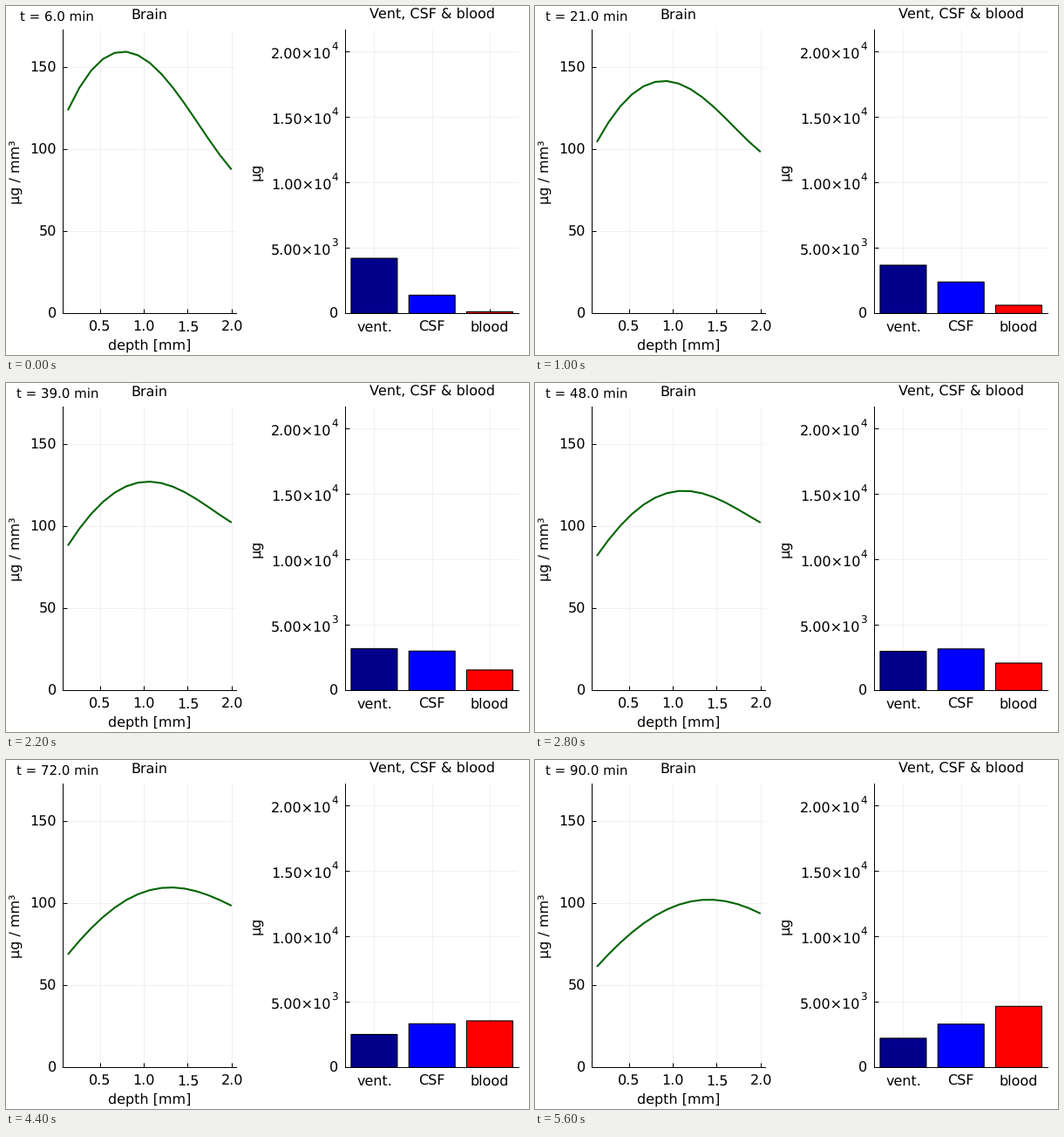
Recreate the animation shown at these times as a matplotlib script. Size 600x400 px, loop 5800 ms.

```python
import matplotlib.pyplot as plt
import numpy as np
from matplotlib.animation import FuncAnimation

W, H, DPI = 600, 400, 100
PX = 72 / DPI
FRAMES, INTERVAL = 29, 200
STEP = 2 / 15
DEPTH = STEP * np.arange(1, 16)

plt.rcParams.update({
    "font.family": "DejaVu Sans",
    "text.hinting": "none",
    "text.hinting_factor": 1,
    "lines.solid_capstyle": "butt",
})


def through(xs, ys, x):
    """Value at x of the polynomial through the points (xs, ys)."""
    return sum(y * np.prod([(x - b) / (a - b) for b in xs if b != a], axis=0)
               for a, y in zip(xs, ys))


def warp(t):
    """Log time: the exchange slows down as the minutes pass."""
    return np.log(t + 40)


# Start, middle and end of the run: five brain depths, three compartments
key_times = warp(np.array([6, 39, 90]))
key_depths = STEP * np.array([1, 3, 6, 10, 15])
brain_keys = np.array([[123.7, 147.9, 159.3, 137.3, 87.6],
                       [88.2, 107.5, 124.3, 124.0, 102.2],
                       [61.3, 75.9, 92.4, 102.0, 93.7]])
amount_keys = np.array([[4217, 1399, 133],
                        [3198, 3011, 1566],
                        [2232, 3311, 4670]])


def brain(t):
    return through(key_depths, through(key_times, brain_keys, warp(t)), DEPTH)


def amounts(t):
    return through(key_times, amount_keys, warp(t))


fig = plt.figure(figsize=(W / DPI, H / DPI), dpi=DPI, facecolor="white")


def label(x, y, s, size=16, ha="center", **kw):
    """Text with its baseline at pixel (x, y), measured from the top left."""
    return fig.text(x / W, 1 - y / H, s, fontsize=size * PX, ha=ha,
                    va="baseline", rotation_mode="anchor", **kw)


def panel(left, right, xlim, ylim, xticks, yticks):
    top, bottom = 27.4, 352.4
    ax = fig.add_axes([left / W, 1 - bottom / H,
                       (right - left) / W, (bottom - top) / H])
    ax.set(xlim=xlim, ylim=ylim, xticks=xticks, yticks=yticks)
    ax.set_axisbelow(True)
    ax.patch.set_visible(False)
    ax.spines[["top", "right"]].set_visible(False)
    ax.spines[["left", "bottom"]].set_linewidth(PX)
    ax.tick_params(direction="in", length=5 * PX, width=PX,
                   labelbottom=False, labelleft=False)
    ax.grid(color="#f0f0f0", linewidth=PX)

    def to_px(x, y):
        return (left + (x - xlim[0]) / (xlim[1] - xlim[0]) * (right - left),
                bottom - y / ylim[1] * (bottom - top))
    return ax, to_px


# Brain profile
xticks, yticks = [0.5, 1.0, 1.5, 2.0], [0, 50, 100, 150]
ax, to_px = panel(65.3, 264.4, (0.0773, 2.056), (0, 172.6), xticks, yticks)
for x in xticks:
    label(to_px(x, 0)[0] + 0.3, 372.4, f"{x:.1f}")
for y in yticks:
    label(58, to_px(0, y)[1] + 5.8, str(y), ha="right")
curve, = ax.plot([], [], color="darkgreen", lw=2.1 * PX,
                 solid_joinstyle="round")
label(164.6, 14.4, "Brain")
label(164.6, 393.4, "depth [mm]")
label(16.5, 190, "µg / mm³", rotation=90)
clock = label(58.9, 16.8, "", size=14.8)

# Compartments
names = ["vent.", "CSF", "blood"]
centers = [0.5, 1.5, 2.5]
yticks = range(0, 20001, 5000)
ax, to_px = panel(389.3, 588.1, (0, 3), (0, 21650), centers, yticks)
for x, name in zip(centers, names):
    label(to_px(x, 0)[0], 372.4, name)
label(381, to_px(0, 0)[1] + 5.8, "0", ha="right")
for y in yticks[1:]:
    mantissa, power = f"{y:.2e}".split("e")
    tick = to_px(0, y)[1]
    label(373.3, tick + 8.6, f"{mantissa}×10", ha="right")
    label(373.3, tick - 1.9, str(int(power)), size=12, ha="left")
bars = ax.bar(centers, [0, 0, 0], width=0.8, lw=1.07 * PX,
              color=["darkblue", "blue", "red"], edgecolor="black", snap=False)
label(489, 14.4, "Vent, CSF & blood")
label(292.3, 190, "µg", rotation=90)


def update(i):
    t = 6 + 3 * i
    curve.set_data(DEPTH, brain(t))
    for bar, height in zip(bars, amounts(t)):
        bar.set_height(height)
    clock.set_text(f"t = {t:.1f} min")
    return curve, clock, *bars


anim = FuncAnimation(fig, update, frames=FRAMES, interval=INTERVAL,
                     repeat=True, repeat_delay=0, blit=False)
plt.show()
```
